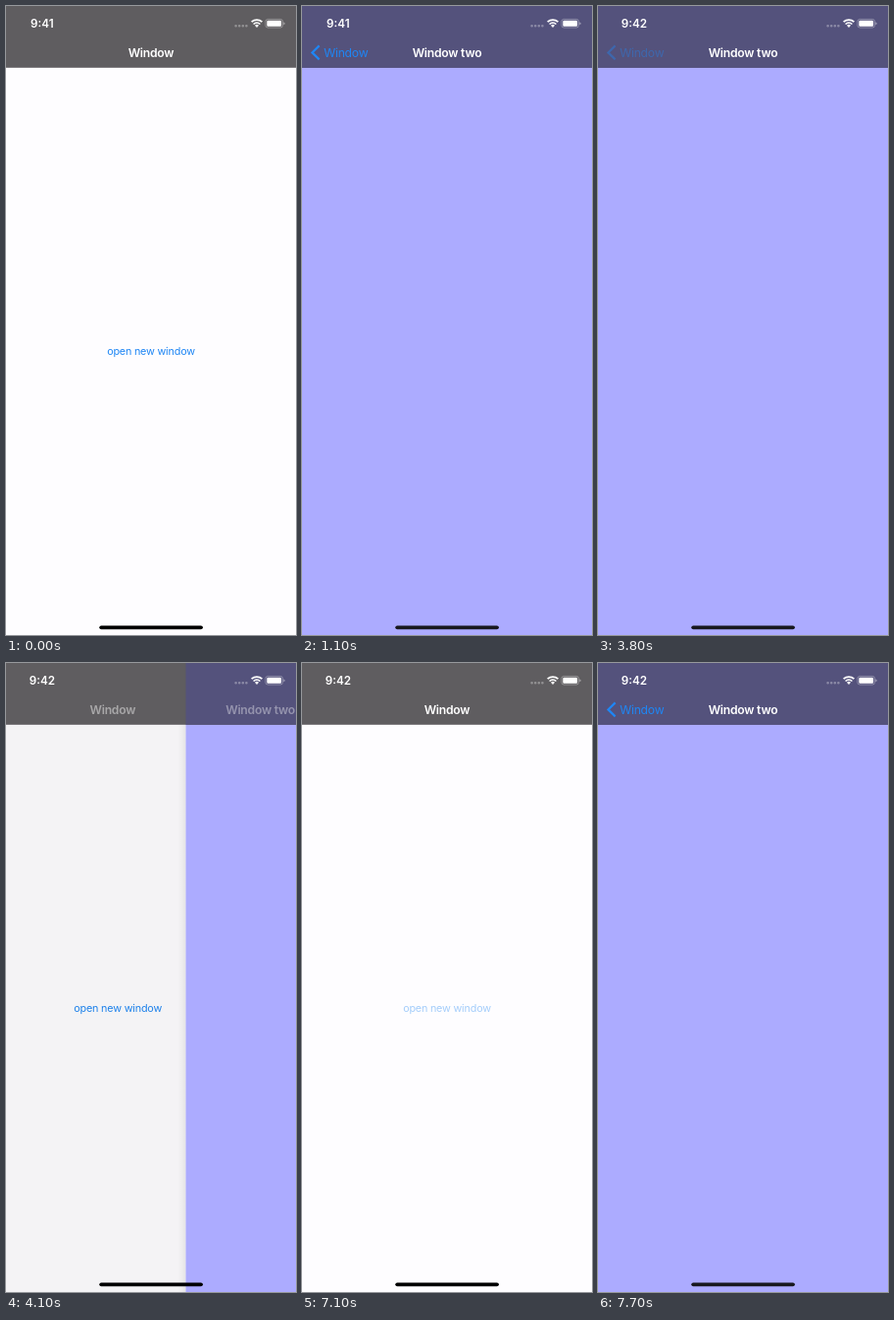
An HTML page that plays this animation: 296x640 px, repeating every 8000 ms.

```html
<!DOCTYPE html>
<html lang="en">
<head>
<meta charset="utf-8">
<title>Push navigation</title>
<style>
  html, body { margin: 0; height: 100%; overflow: hidden; }

  /* --p is how far the second window is pushed in, from 0 to 1 */
  svg {
    display: block; width: 100vw; height: 100vh;
    --white: #fefdff; --lavender: #acabff; --gray: #5f5d60; --violet: #54527c;
    --blue: #1f86f4;
    font-family: Inter, sans-serif;
    animation: 8s step-end infinite push, 8s step-end infinite theme,
               8s step-end infinite link, 8s step-end infinite back;
  }
  @keyframes push {
    0%, 56.25% { --p: 0; }
    7.5%, 90% { --p: .045; }
    8.75%, 91.25% { --p: .62; }
    10%, 92.5% { --p: .9; }
    11.25%, 93.75% { --p: .98; }
    12.5%, 95% { --p: .995; }
    13.75%, 96.25%, 100% { --p: 1; }
    50% { --p: .955; }
    51.25% { --p: .38; }
    52.5% { --p: .1; }
    53.75% { --p: .02; }
    55% { --p: .005; }
  }
  @keyframes theme {
    0%, 50% { --base: var(--white); --bar: var(--gray); --home: #000; }
    7.5%, 90%, 100% { --base: var(--lavender); --bar: var(--violet); --home: #18181e; }
  }
  @keyframes link {
    0%, 50% { --link: 1; }
    6.25%, 88.75%, 100% { --link: .4; }
  }
  @keyframes back {
    0%, 56.25%, 100% { --back: 1; }
    47.5% { --back: .4; }
  }
  @keyframes early { 0% { opacity: 1; } 33.75%, 100% { opacity: 0; } }
  @keyframes late { 0% { opacity: 0; } 33.75%, 100% { opacity: 1; } }

  .slide { transform: translateX(calc((1 - var(--p)) * 296px)); }
  .shadow { opacity: min(1, var(--p) * 30); }
  .dim { opacity: calc(var(--p) * .1); }
  .link {
    font-size: 10.8px; letter-spacing: -.2px; fill: var(--blue);
    opacity: var(--link); transform: translateX(calc(var(--p) * -89px));
  }
  .nav { font-size: 12.2px; letter-spacing: -.25px; }
  .title { font-weight: 600; fill: #fff; }
  .first { opacity: clamp(0, 1.1 - var(--p) * 1.7, 1); transform: translateX(calc(var(--p) * -103px)); }
  .second { opacity: var(--p); transform: translateX(calc((1 - var(--p)) * 180px)); }
  .chevron, .label { opacity: calc(clamp(0, var(--p) * 2 - 1, 1) * var(--back)); }
  .chevron { fill: none; stroke: var(--blue); stroke-width: 2.2; }
  .label { fill: var(--blue); transform: translateX(calc((1 - var(--p)) * 103px)); }
  .clock { font-size: 11.7px; font-weight: 600; fill: #fff; }
  .early { animation: early 8s step-end infinite; }
  .late { animation: late 8s step-end infinite; }
  .mid { text-anchor: middle; }
</style>
</head>
<body>
<svg viewBox="0 0 296 640" preserveAspectRatio="none">
  <defs>
    <linearGradient id="edge">
      <stop offset="0" stop-opacity="0"/>
      <stop offset="1" stop-opacity=".06"/>
    </linearGradient>
  </defs>

  <rect width="296" height="640" fill="var(--base)"/>
  <text class="link mid" x="148" y="355.3">open new window</text>
  <rect class="dim" width="296" height="640"/>
  <g class="slide">
    <rect class="shadow" x="-8" width="8" height="640" fill="url(#edge)"/>
    <rect width="296" height="640" fill="var(--lavender)"/>
  </g>

  <rect width="296" height="62.8" fill="var(--bar)"/>
  <rect class="slide" width="296" height="62.8" fill="var(--violet)"/>
  <g class="nav">
    <text class="title first mid" x="148" y="51.6">Window</text>
    <text class="title second mid" x="148" y="51.6">Window two</text>
    <path class="chevron" d="M17.6 40.4L10.4 47.4L17.6 54.4"/>
    <text class="label" x="22.2" y="51.6">Window</text>
  </g>

  <g class="clock mid">
    <text class="early" x="36.9" y="22">9:41</text>
    <text class="late" x="36.9" y="22">9:42</text>
  </g>
  <path d="M234.6 20.2h11" stroke="#fff" stroke-opacity=".33" stroke-width="2.6"
        stroke-linecap="round" stroke-dasharray="0 3.6"/>
  <g fill="none" stroke="#fff" stroke-width="1.7">
    <path d="M250.6 16.2a7.9 7.9 0 0 1 10.8 0"/>
    <path d="M252.6 18.5a4.9 4.9 0 0 1 6.8 0"/>
    <path d="M254 19.8a2.9 2.9 0 0 1 4 0l-2 2.1z" fill="#fff" stroke="none"/>
  </g>
  <g fill="#fff">
    <rect x="264.9" y="13.4" width="17.6" height="8.6" rx="2.4" fill="none" stroke="#fff" stroke-opacity=".4" stroke-width=".8"/>
    <rect x="266.3" y="14.7" width="14.8" height="6" rx="1.2"/>
    <path d="M283.3 16.2q1.4 .5 1.4 1.5t-1.4 1.5z" fill-opacity=".45"/>
  </g>

  <rect x="95.3" y="630.4" width="105.6" height="3.9" rx="1.95" fill="var(--home)"/>
</svg>
</body>
</html>
```
